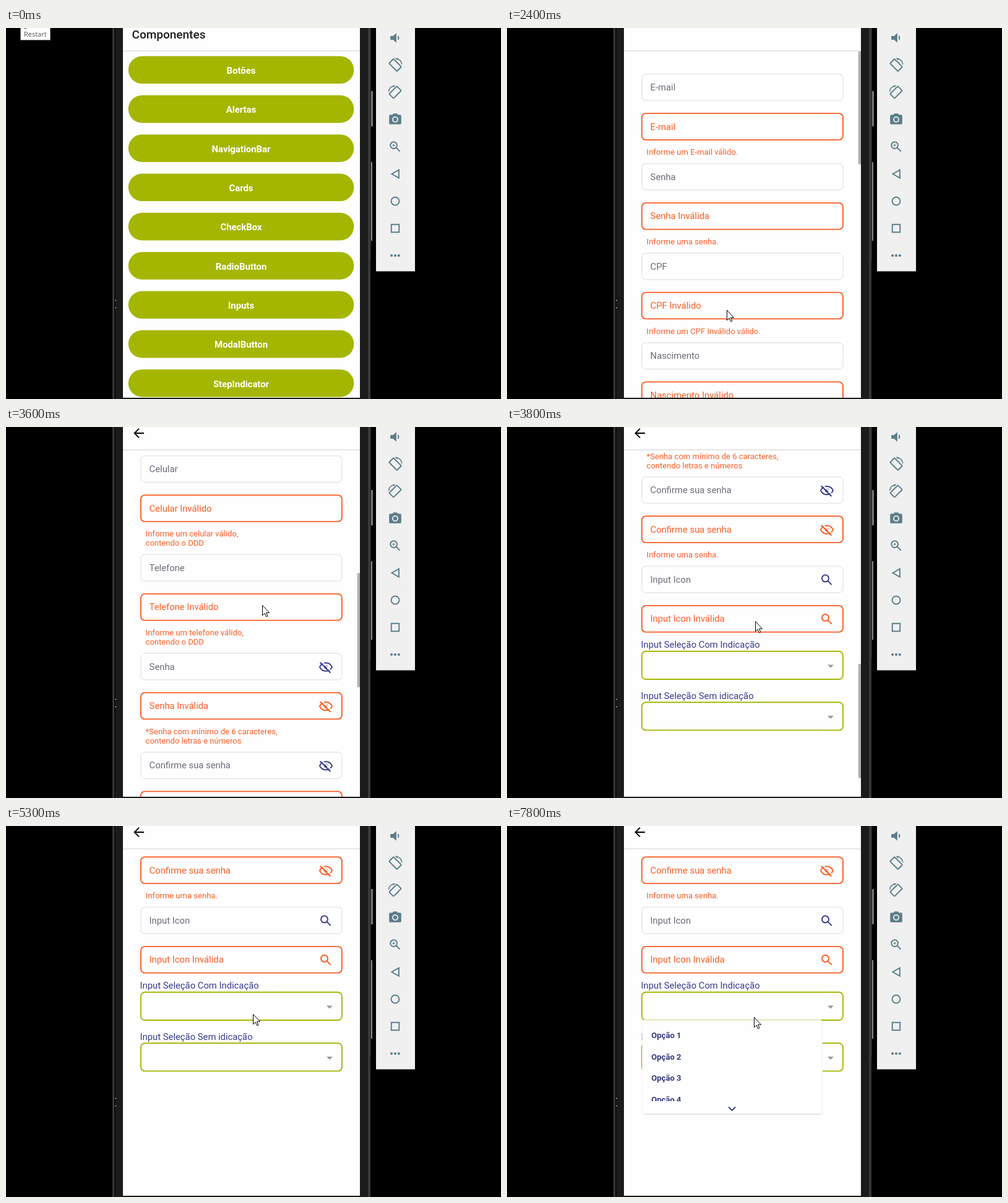
An HTML page that plays this animation: 800 px wide and 600 px high, repeating every 8000 ms.

```html
<!DOCTYPE html>
<html lang="pt">
<head>
<meta charset="utf-8">
<title>Componentes</title>
<style>
html, body { margin: 0; width: 100%; height: 100%; overflow: hidden; background: #000; }
svg { display: block; }
text { font-family: Roboto, Arial, sans-serif; white-space: pre; }
.input { font-size: 14.8px; }
.hint { font-size: 13.05px; fill: #fc5c24; }
.button { font-size: 14.9px; font-weight: 700; fill: #fff; text-anchor: middle; }
.option { font-size: 13.1px; font-weight: 700; fill: #373b84; }
.title { font-size: 19px; font-weight: 500; fill: #1c1c1e; }
.tip { font: 11px 'Open Sans', 'Noto Sans', sans-serif; fill: #575757; }
.line { fill: none; stroke: currentColor; stroke-width: 2; }
.solid { fill: currentColor; }
</style>
</head>
<body>
<svg id="stage" width="800" height="600" viewBox="0 0 800 600"></svg>
<script>
(() => {
const LOOP = 8000, STEP = 100;
const OLIVE = '#a4b600', ORANGE = '#fc5c24', NAVY = '#383d8b', GREY = '#6d6a79';
const STEEL = '#5c7d8a', PANEL = '#f0f0f0', PAGE = '#fefefe';
const GROUP_HEIGHT = 144.75, HINT_LINE = 15;

const rect = (x, y, w, h, fill, more = '') =>
  `<rect x="${x}" y="${y}" width="${w}" height="${h}" fill="${fill}" ${more}/>`;
const text = (x, y, cls, str, fill) =>
  `<text x="${x}" y="${y}" class="${cls}" ${fill ? `fill="${fill}"` : ''}>${str}</text>`;
const line = (d, more = '') => `<path class="line" d="${d}" ${more}/>`;
const solid = d => `<path class="solid" d="${d}"/>`;
const ring = (r, more = '') => `<circle class="line" r="${r}" ${more}/>`;
const disc = (r, fill = 'currentColor') => `<circle r="${r}" fill="${fill}"/>`;

// Icons drawn around their centre
const lens = '<g transform="translate(-2.5 -2.5)">' + ring(5.5) + line('M4 4l6.3 6.3', 'stroke-width="2.4"') + '</g>';
const ICONS = {
  back: line('M8 0H-7M0-7.4L-7.4 0 0 7.4'),
  eye: line('M-10 0C-6-8.7 6-8.7 10 0 6 8.7-6 8.7-10 0z') + disc(3) +
    `<path d="M-8-10L10 8" stroke="${PAGE}" stroke-width="2"/>` + line('M-9.4-7.4L7.4 9.4'),
  search: lens,
  zoom: lens + line('M-5-2.5h5M-2.5-5v5', 'style="stroke-width:1"'),
  drop: solid('M-5-2.5H5L0 2.5z'),
  volume: solid('M-8-3v6h4.4l5.5 5V-8l-5.5 5zM4.2-4a4.5 4.5 0 0 1 0 8z'),
  rotate: rect(-9.2, -5.2, 18.4, 10.4, 'none', 'rx="1" transform="rotate(45)" class="line"') +
    line('M3.5-10.4A11 11 0 0 1 11-1', 'style="stroke-width:1.5"') + solid('M-.7-11.8L3-8l1.5-3.4z'),
  camera: rect(-10, -8, 20, 16, 'currentColor', 'rx="2"') + solid('M-5-7l2-3h6l2 3z') + disc(5, PANEL) + disc(3.2),
  triangle: line('M6-6.7V6.7L-5.6 0z'),
  circle: ring(6.6),
  square: rect(-6.4, -6.4, 12.8, 12.8, 'none', 'class="line"'),
  dots: [-6, 0, 6].map(x => `<g transform="translate(${x})">${disc(2.1)}</g>`).join('')
};
const icon = (name, x, y, color, scale = '1') =>
  `<g color="${color}" transform="translate(${x} ${y}) scale(${scale})">${ICONS[name]}</g>`;

const box = (y, h, color, width) =>
  rect(217.9, y + .6, 325, h, 'none', `rx="6.5" stroke="${color}" stroke-width="${width}"`);

function field(y, label, bad, glyph) {
  return box(y, 42.8, bad ? ORANGE : '#e9e9eb', bad ? 1.9 : 1.6) +
    text(231.6, y + 27, 'input', label, bad ? ORANGE : GREY) +
    (glyph ? `<g class="late">${icon(glyph, 517, y + 22.6, bad ? ORANGE : NAVY)}</g>` : '');
}

const select = (y, label) => text(216.6, y - 4.7, 'input', label, NAVY) +
  box(y + .2, 45.2, OLIVE, 1.9) + icon('drop', 523, y + 25.1, '#999');

// label, invalid label, hint lines, icon
const GROUPS = [
  ['E-mail', 'E-mail', ['Informe um E-mail válido.']],
  ['Senha', 'Senha Inválida', ['Informe uma senha.'], 'eye'],
  ['CPF', 'CPF Inválido', ['Informe um CPF Inválido válido.']],
  ['Nascimento', 'Nascimento Inválido', ['Informe uma nascimento inválido válida.']],
  ['Celular', 'Celular Inválido', ['Informe um celular válido,', 'contendo o DDD']],
  ['Telefone', 'Telefone Inválido', ['Informe um telefone válido,', 'contendo o DDD']],
  ['Senha', 'Senha Inválida', ['*Senha com mínimo de 6 caracteres,', 'contendo letras e números'], 'eye'],
  ['Confirme sua senha', 'Confirme sua senha', ['Informe uma senha.'], 'eye'],
  ['Input Icon', 'Input Icon Inválida', [], 'search']
];

let rowY = 74, form = '';
for (const [label, invalid, hints, glyph] of GROUPS) {
  form += field(rowY, label, false, glyph) + field(rowY + 63.5, invalid, true, glyph);
  hints.forEach((str, i) => form += text(225.6, rowY + 131.4 + i * HINT_LINE, 'hint', str));
  rowY += GROUP_HEIGHT + Math.max(0, hints.length - 1) * HINT_LINE;
}
form += select(rowY - 7.5, 'Input Seleção Com Indicação') + select(rowY + 74.9, 'Input Seleção Sem idicação');
const END = rowY - 275.5;

const buttons = ['Botões', 'Alertas', 'NavigationBar', 'Cards', 'CheckBox', 'RadioButton',
  'Inputs', 'ModalButton', 'StepIndicator'].map((name, i) => {
    const y = 45.5 + i * 63.33;
    return rect(197.7, y, 364.6, 44.6, OLIVE, 'rx="22.3"') + text(380, y + 28.4, 'button', name);
  }).join('');

const options = [1, 2, 3, 4].map(n => text(233.2, 308.5 + n * 34.5, 'option', 'Opção ' + n)).join('');
const menu = rect(218.5, 315, 291.5, 152, '#dcdcdc', 'rx="5"') + rect(218.5, 313.4, 291, 152, PAGE, 'rx="4"') +
  `<g clip-path="url(#options)">${options}</g>` + line('M358 454.5l5.6 5.4 5.6-5.4', `color="${NAVY}"`);

const column = (x, w, fill, y = 0, h = 600) => rect(x, y, w, h, fill);
const phone = column(172, 4, '#363636') + column(175, 2, '#0c0c0c') + column(177, 408, '#1b1b1b') +
  column(585, 4, '#383838') + column(589, 1, '#222', 0, 374) +
  column(590, 3, '#777', 102, 57) + column(590, 2, '#8a8a8a', 217, 127) + column(189, 383, PAGE, 0, 598);

const TOOLS = ['volume', 'rotate', 'rotate', 'camera', 'zoom', 'triangle', 'circle', 'square', 'dots'];
const panel = rect(598, 0, 63, 393.5, PANEL) + TOOLS.map((name, i) =>
  icon(name, 629, 16 + i * 44, STEEL, i === 2 ? '-.96 .96' : '.98')).join('');

document.getElementById('stage').innerHTML = `
  <defs>
    <clipPath id="body">${rect(189, 37, 383, 561)}</clipPath>
    <clipPath id="options">${rect(218, 314, 292, 131)}</clipPath>
  </defs>
  ${phone}${rect(176, 440, 2, 1, '#ddd')}${rect(176, 452, 2, 1, '#ddd')}
  <g clip-path="url(#body)">
    <g id="list">${buttons}</g>
    <g id="form">${form}</g>
    <g id="bar">${rect(567.7, 36, 4.3, 184.5, '#b0b0b0')}</g>
  </g>
  ${rect(189, 36, 383, 2, '#e6e6e8')}
  <g id="title">${text(203.5, 17.2, 'title', 'Componentes')}</g>
  <g class="late">${icon('back', 215, 10, '#000')}</g>
  <g id="menu">${menu}</g>
  ${panel}
  <g id="tip">${rect(23.5, -5, 48, 24.5, '#fff', 'stroke="#777"')}${text(29, 14, 'tip', 'Restart')}</g>
  <path id="cursor" d="M.5.5v16.2l3.7-3.5 2.5 5.6 2.3-1-2.4-5.5h5z" fill="#fff" stroke="#000"/>`;

// Pointer moves: start, end, x, y
const MOVES = [
  [0, 800, 350, 467], [1100, 1400, 355, 456], [2800, 3200, 418, 279], [3500, 3800, 401, 314],
  [4100, 4400, 401, 293], [4500, 5300, 399, 304], [5500, 6000, 310, 290],
  [6100, 6200, 439, 269], [6300, 6400, 399, 309]
];

const ramp = (t, from, to) => Math.min(1, Math.max(0, (t - from) / (to - from)));
const smooth = p => p * p * (3 - 2 * p);

function pointer(t) {
  let x = 24, y = -18;
  for (const [from, to, toX, toY] of MOVES) {
    const p = smooth(ramp(t, from, to));
    x += (toX - x) * p;
    y += (toY - y) * p;
  }
  return [Math.round(x), Math.round(y)];
}

// A drag that speeds up, then a flick that slows to the end
function scrollAt(t) {
  const drag = 200 * ramp(t, 2900, 3400) ** 2;
  const flick = 1 - (1 - ramp(t, 3500, 4000)) ** 2.52;
  return drag + (END - 200) * flick;
}

const el = id => document.getElementById(id);
const show = (node, on) => node.setAttribute('visibility', on ? 'visible' : 'hidden');
const move = (id, x, y) => el(id).setAttribute('transform', `translate(${x} ${y})`);
const late = document.querySelectorAll('.late');

function draw(t) {
  const inForm = t >= 2400, scroll = scrollAt(t);
  show(el('tip'), t < 100);
  show(el('list'), !inForm);
  show(el('title'), !inForm);
  show(el('form'), inForm);
  show(el('bar'), inForm);
  late.forEach(node => show(node, t >= 2500));
  show(el('menu'), t >= 7800);
  move('form', 0, -scroll);
  move('bar', 0, scroll * .33);
  el('bar').setAttribute('opacity', 1 - (t < 3000 ? ramp(t, 2500, 2700) : ramp(t, 4500, 4800)));
  move('cursor', ...pointer(t));
}

const start = performance.now();
function tick() {
  const t = (performance.now() - start) % LOOP;
  draw(Math.floor(t / STEP) * STEP);
  requestAnimationFrame(tick);
}
tick();
})();
</script>
</body>
</html>
```
